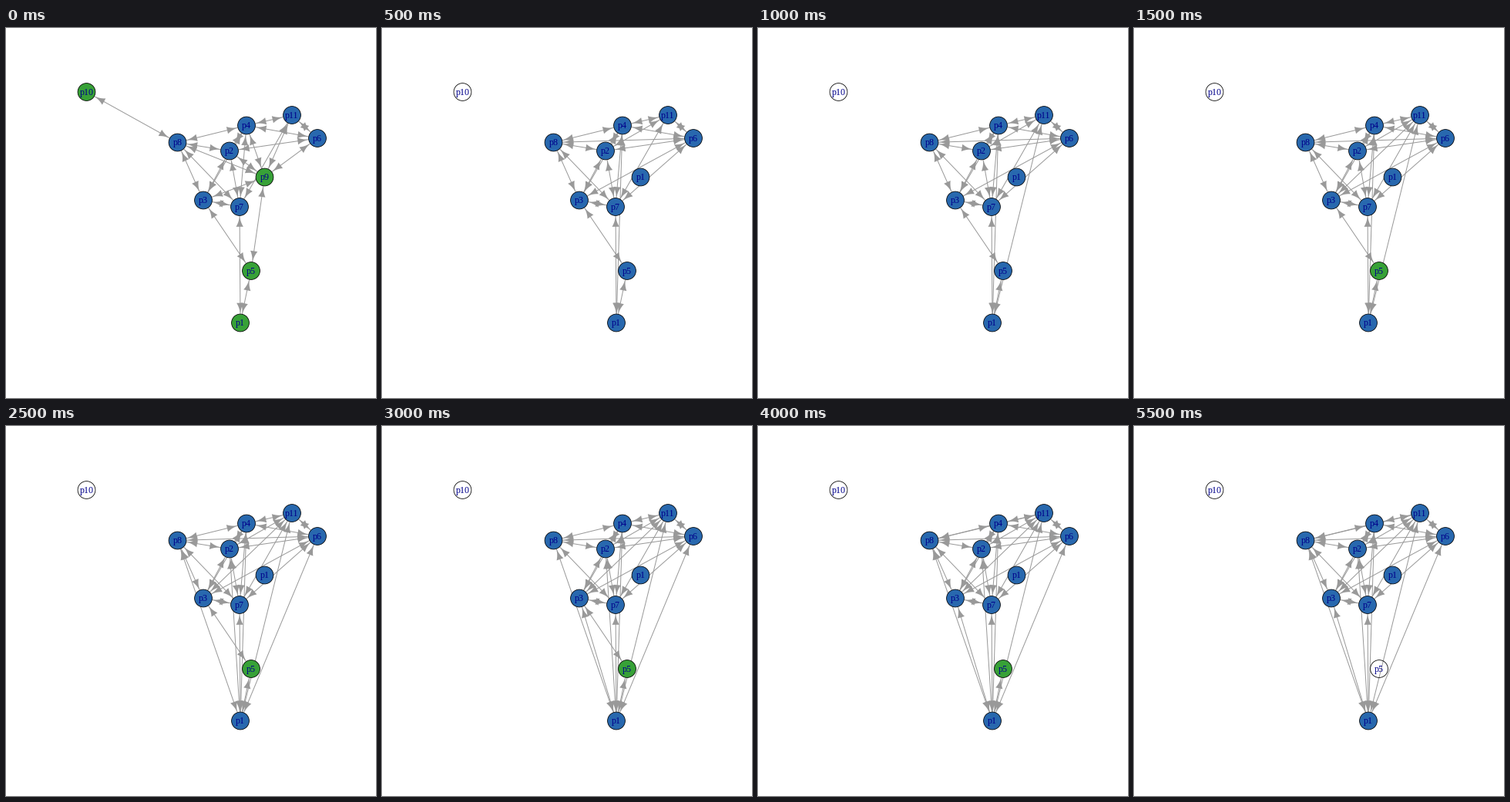
Recreate the animation shown at these times as a matplotlib script. Size 480 by 480 pixels, loop 7 s.

```python
import matplotlib.pyplot as plt
import numpy as np
from matplotlib.animation import FuncAnimation

SIZE, DPI = 480, 72
STEP, FRAMES = 500, 14
RADIUS, HEAD = 11.4, 14.4
BLUE, GREEN, CLEAR = "#2868AE", "#37A137", "none"
EDGE, INK = "#999999", "#00008B"

NODES = {
    1: (304, 382.5), 2: (290, 159.5), 3: (256, 223.5), 4: (312, 126.5),
    5: (318, 315), 6: (404, 143), 7: (303, 232), 8: (222.5, 148.5),
    9: (335.5, 193.5), 10: (104.5, 83), 11: (371, 113),
}


def pairs(text):
    return {tuple(map(int, p.split("-"))) for p in text.split()}


CORE = pairs("8-4 8-2 8-3 8-7 4-11 4-6 4-2 4-3 4-7 2-6 2-3 2-7 "
             "11-6 11-7 3-7 3-5 7-1 5-1")
FIRST = CORE | pairs("10-8 8-9 4-9 2-9 11-9 6-9 3-9 5-9")
LATER = CORE | pairs("8-6 2-11 6-3 6-7 4-1")

# step at which it happens, edges added, edges removed
CHANGES = [
    (2, "11-1", ""),
    (3, "11-3", ""),
    (4, "2-1", ""),
    (5, "6-1 8-1", ""),
    (6, "3-1", "8-3"),
    (8, "8-3 8-11", "3-5"),
    (11, "", "5-1"),
]


def edges_at(step):
    if step == 0:
        return FIRST
    edges = set(LATER)
    for start, added, removed in CHANGES:
        if step >= start:
            edges = (edges | pairs(added)) - pairs(removed)
    return edges


def fill_of(node, step):
    if step == 0:
        return GREEN if node in (1, 5, 9, 10) else BLUE
    if node == 10 or (node == 5 and step >= 11):
        return CLEAR
    return GREEN if node == 5 and step >= 3 else BLUE


def label_of(node, step):
    return "p1" if node == 9 and step > 0 else f"p{node}"


def arrow_head(tip, way):
    """Head with concave sides, narrow at the tip and flaring to the base."""
    back = HEAD * np.sqrt(np.linspace(0, 1, 12))
    half = 0.3 * back**2 / HEAD + 0.36
    side = np.array([-way[1], way[0]])
    spine = tip - np.outer(back, way)
    wing = np.outer(half, side)
    return np.vstack([spine + wing, (spine - wing)[::-1]])


def draw_edge(a, b):
    a, b = np.array(NODES[a]), np.array(NODES[b])
    way = (b - a) / np.hypot(*(b - a))
    start, end = a + RADIUS * way, b - RADIUS * way
    inset = HEAD / 2 * way
    ax.plot(*zip(start + inset, end - inset), color=EDGE, lw=1,
            solid_capstyle="butt", zorder=1)
    for tip, direction in ((start, -way), (end, way)):
        ax.add_patch(plt.Polygon(arrow_head(tip, direction), fc=EDGE,
                                 ec="none", zorder=1))


def draw_node(node, step):
    x, y = NODES[node]
    ax.add_patch(plt.Circle((x, y), RADIUS, fc=fill_of(node, step),
                            ec="black", lw=0.8, zorder=2))
    ax.text(x, y + 3.7, label_of(node, step), color=INK, fontsize=12,
            family="Liberation Serif", ha="center", va="baseline", zorder=3)


def draw(step):
    ax.clear()
    ax.set(xlim=(0, SIZE), ylim=(SIZE, 0))
    ax.axis("off")
    for a, b in sorted(edges_at(step)):
        draw_edge(a, b)
    for node in NODES:
        draw_node(node, step)
    return []


fig = plt.figure(figsize=(SIZE / DPI, SIZE / DPI), dpi=DPI, facecolor="white")
ax = fig.add_axes([0, 0, 1, 1])
anim = FuncAnimation(fig, draw, frames=FRAMES, interval=STEP,
                     init_func=lambda: draw(0), repeat=True, repeat_delay=0)
plt.show()
```
